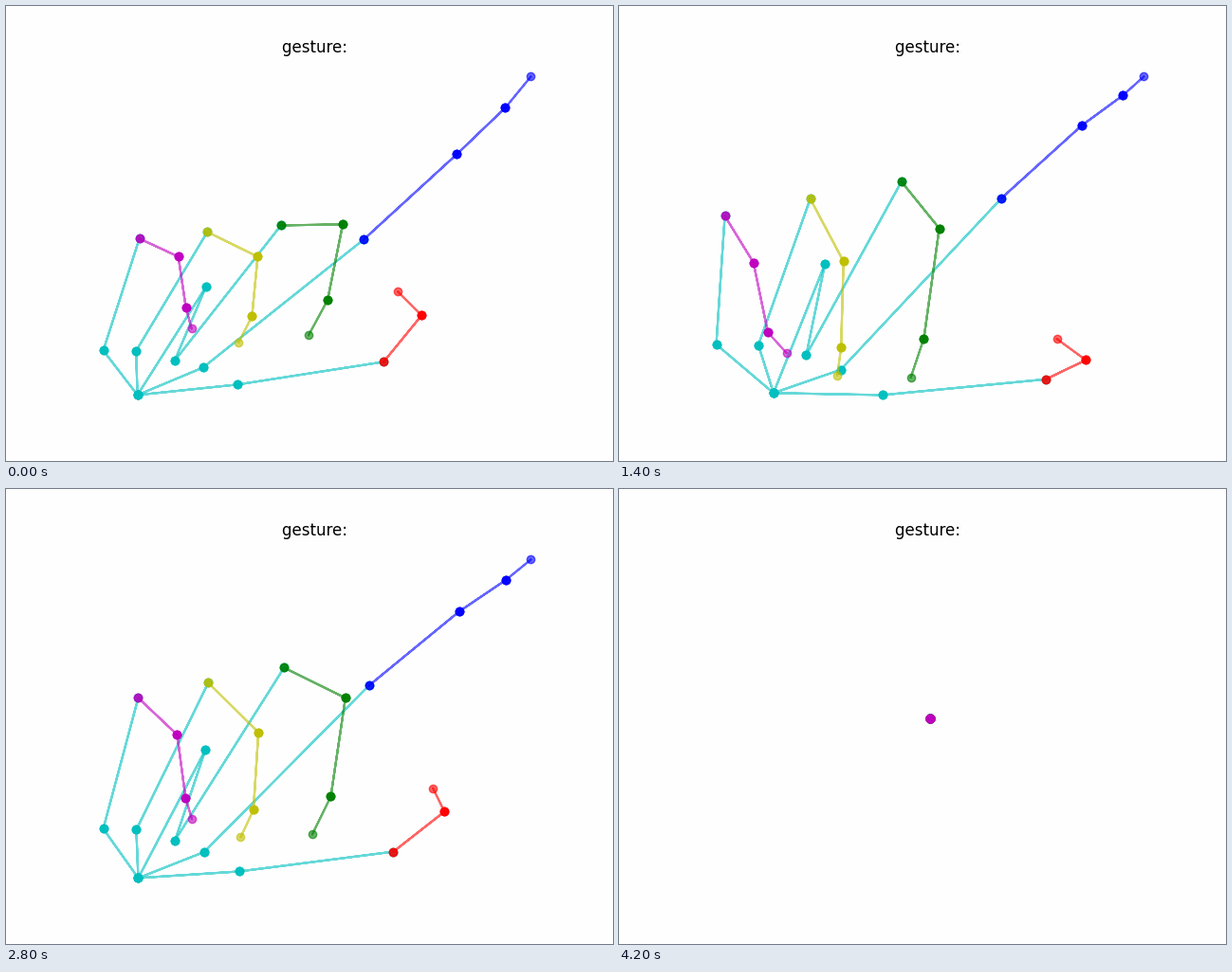
Recreate the animation shown at these times as a matplotlib script. Size 640 by 480 pixels, loop 9 s.

```python
import numpy as np
import matplotlib.pyplot as plt
from matplotlib.animation import FuncAnimation

STEP_MS = 100
N_FRAMES = 90
LOST_AT = 42          # tracking is lost: every joint collapses to one point


def points(*xy):
    return np.array(xy, float).reshape(-1, 2)


# Rest pose: each finger runs from the palm to its tip.
ROOT = points(139, 410, 211, 296)
THUMB = points(244, 399, 398, 375, 438, 326, 413, 301)
INDEX = points(208, 381, 377, 246, 475, 156, 526, 107, 553, 74)
MIDDLE = points(178, 374, 290, 231, 355, 230, 339, 310, 319, 347)
PINKY = points(103, 363, 141, 245, 182, 264, 190, 318, 196, 340)
RING_SAG = points(-3, -5, -3, 0, -3, 17, -5, 13, -12, 11)

# Key times and, at each, the offsets from the rest pose:
# wrist x, y; index knuckle x, y; pinky knuckle x, y;
# finger drop, finger bend; thumb drop, thumb spread
TIMES = np.array([0, 7, 14, 23, 28, 34, 41])
KEYS = np.array([
    [0] * 10,
    [22, 0, 21, -12, -27, -5, 46, 44, 40, -7],
    [26, 0, 27, -43, -27, -23, 92, 39, 49, 20],
    [-11, -21, -6, -53, 19, -69, 113, 20, 58, 18],
    [2, 0, 6, -39, 0, -25, 60, 1, 14, 35],
    [71, 0, 48, -37, -38, 9, -6, 0, -49, 0]], float)
KEYS = np.vstack([KEYS, 1.1 * KEYS[-1] - 0.1 * KEYS[-2]])
SLOPES = np.gradient(KEYS, TIMES, axis=0)


def ease(frame):
    """Smooth curve through the key values."""
    k = min(np.searchsorted(TIMES, frame, side="right") - 1, len(TIMES) - 2)
    span = TIMES[k + 1] - TIMES[k]
    u = (frame - TIMES[k]) / span
    return ((1 + 2 * u) * (1 - u) ** 2 * KEYS[k]
            + u * (1 - u) ** 2 * span * SLOPES[k]
            + u * u * (3 - 2 * u) * KEYS[k + 1]
            + u * u * (u - 1) * span * SLOPES[k + 1])


def shift(base, dx, dy):
    return base + np.column_stack([dx, dy])


def pose(wx, wy, ix, iy, px, py, drop, bend, tdrop, spread):
    """All joints, with each finger following its knuckle and the wrist."""
    mx, my = (2 * ix + px) / 3, 1.25 * (2 * iy + py) / 3
    root = shift(ROOT, [wx, 0.3 * wx], [wy, (wy + my) / 2])
    thumb = shift(
        THUMB,
        wx * np.array([1.35, 1.85, 1.62, 1.11])
        + spread * np.array([0, 0.2, 0.6, 1]),
        [wy + 0.3 * tdrop - 0.06 * wx, 0.55 * tdrop - 0.25 * wx,
         tdrop, tdrop + 0.1 * wx])
    index = shift(
        INDEX,
        [1.05 * wx, ix, 0.48 * ix, 0.18 * ix, 0],
        [wy + 0.12 * tdrop - 0.06 * wx, iy, 0.7 * iy, 0.3 * iy, 0])
    middle = shift(
        MIDDLE,
        [0.82 * wx, mx, mx - 0.65 * bend,
         mx + 0.52 * wx - bend, mx + 0.76 * wx - bend],
        [wy + 0.1 * iy, my, my + 0.55 * drop, my + 0.95 * drop, my + drop])
    pinky = shift(
        PINKY,
        [0.65 * wx + 0.55 * px, px, px + 0.1 * wx - 0.35 * bend,
         px + 0.6 * wx - 0.5 * bend, px + 0.9 * wx - 0.35 * bend],
        [wy + 0.2 * py, py, py + 0.33 * drop,
         py + 0.55 * drop, py + 0.55 * drop])
    ring = (middle + pinky) / 2 + RING_SAG
    return np.vstack([root, thumb, index, middle, ring, pinky])


def hand(frame):
    """Joints at a frame, scaled so that the hand fills the unit square."""
    p = pose(*ease(min(frame, LOST_AT - 1)))
    if frame >= LOST_AT:
        return np.full_like(p, 0.5)
    low, high = p.min(axis=0), p.max(axis=0)
    return (p - low) / (high - low)


# Retracing a bone stacks its markers, so only the fingertips stay pale.
WRIST, PALM = 0, 1
palm_bones, finger_bones = [([WRIST, PALM] * 2, "c")], []
first = 2
for color, size in zip("rbgym", (4, 5, 5, 5, 5)):
    hub = PALM if color == "g" else WRIST
    tip = first + size - 1
    palm_bones += [([hub, first] * 2, "c"), ([first, first + 1] * 2, "c")]
    finger_bones += [([j, j + 1] * 2, color) for j in range(first + 1, tip - 1)]
    finger_bones.append(([tip - 1, tip, tip - 1], color))
    first = tip + 1
bones = palm_bones + finger_bones

fig, ax = plt.subplots(figsize=(6.4, 4.8), dpi=100, facecolor="#fefefe")
ax.set_xlim(-0.05, 1.05)
ax.set_ylim(1.05, -0.05)
ax.axis("off")
ax.set_title("gesture: ")
lines = [ax.plot([], [], "o-", color=c, alpha=0.6)[0] for _, c in bones]


def draw(frame):
    joints = hand(frame)
    for line, (path, _) in zip(lines, bones):
        line.set_data(joints[path].T)
    return lines


anim = FuncAnimation(fig, draw, frames=N_FRAMES, interval=STEP_MS,
                     init_func=lambda: draw(0), repeat=True)
plt.show()
```
